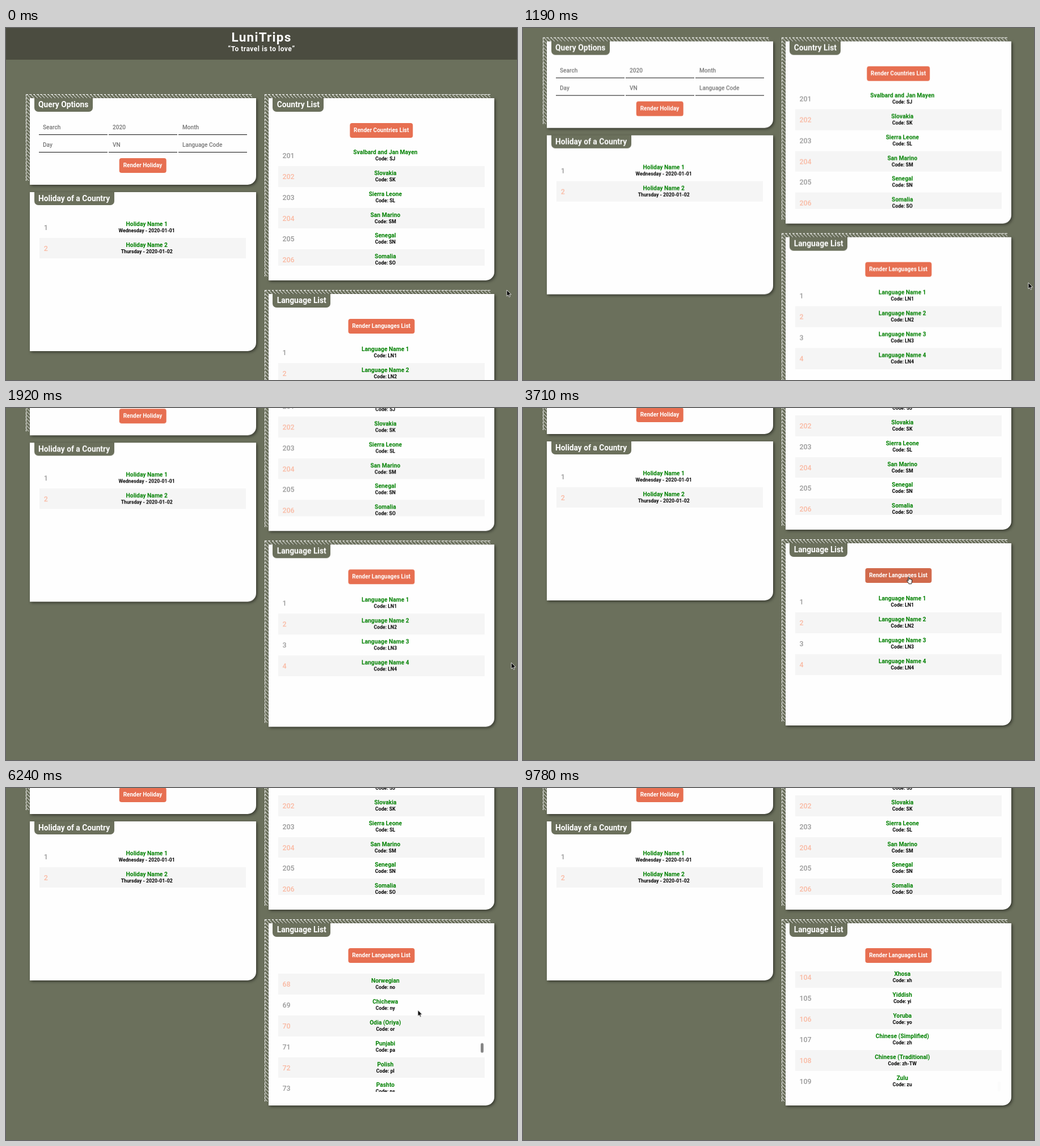
Recreate the animation shown at these times as an HTML page. Size 901 by 622 pixels, loop 9920 ms.

```html
<!DOCTYPE html>
<html lang="en">
<head>
<meta charset="utf-8">
<title>LuniTrips</title>
<style>
  html, body { margin: 0; width: 100%; height: 100%; overflow: hidden; background: #6b705c; }
  body { position: relative; font: 500 10.1px/12px Roboto, sans-serif; color: #000; }
  .page, .page div, .page span, svg { position: absolute; white-space: nowrap; }
  .page { left: 0; top: 0; width: 901px; height: 860px; }
  .top { left: 0; top: 0; width: 901px; height: 56px; background: #4b4c40; color: #fff; font-weight: 700; text-align: center; }
  .top span { left: 0; width: 100%; }
  .brand { top: 3px; font-size: 22.5px; line-height: 26px; letter-spacing: 1.25px; }
  .motto { top: 30px; font-size: 12px; line-height: 14px; letter-spacing: .5px; }

  .card { width: 398.5px; }
  .face { inset: 0; background: #fefefe; border-radius: 0 0 15px 0; box-shadow: 2px 2px 5px rgba(0, 0, 0, .5); }
  .hatch {
    inset: -7px 7px 7px -7px;
    background:
      repeating-linear-gradient(90deg, #fff 0 3.75px, transparent 3.75px 6.26px) 0 0 / 100% 1.25px no-repeat,
      repeating-linear-gradient(180deg, #fff 0 3.75px, transparent 3.75px 6.26px) 0 0 / 1.25px 100% no-repeat,
      repeating-linear-gradient(45deg, transparent 0 2.9px, #fff 3.65px, transparent 4.4px);
  }
  .tab { left: 7.5px; top: 0; height: 23.5px; padding: 0 7.5px; border-radius: 0 0 7px 7px; background: #6b705c; color: #fff; font: 700 13.77px/23px Roboto, sans-serif; }
  .btn { left: 199px; height: 26px; padding: 0 7px; border-radius: 4px; background: #e76f51; color: #fff; font-size: 10px; font-weight: 700; line-height: 26px; transform: translateX(-50%); }
  .field { width: 113.5px; height: 25px; padding-left: 7px; border-bottom: 1px solid #111; color: #757575; line-height: 25px; }

  .view { left: 17.4px; width: 363.5px; height: 213px; overflow: hidden; }
  .rows { left: 0; top: 0; width: 100%; }
  .row { left: 0; width: 100%; height: 36.85px; }
  .row.even { background: #f5f5f5; }
  .num { left: 7.3px; top: 11px; font-size: 12.5px; line-height: 15px; color: #999; }
  .even .num { color: #fab9a2; }
  .name, .note { left: 0; width: 377.6px; text-align: center; font-weight: 700; }
  .name { top: 7px; font-size: 10.3px; color: green; }
  .note { top: 18px; font-size: 8.7px; }
  .thumb { left: 357px; top: 2px; width: 5px; height: 17px; border-radius: 3px; background: #858585; }
  svg { left: 0; top: 0; overflow: visible; }
</style>
</head>
<body>
<div class="page" id="page">
  <div class="top">
    <span class="brand">LuniTrips</span>
    <span class="motto">“To travel is to love”</span>
  </div>

  <div class="card" style="left:42px;top:124px;height:153px">
    <div class="hatch"></div><div class="face"></div>
    <div class="tab">Query Options</div>
    <div id="fields"></div>
    <div class="btn" style="top:105.5px">Render Holiday</div>
  </div>

  <div class="card" style="left:42px;top:289.5px;height:281.5px">
    <div class="face"></div>
    <div class="tab">Holiday of a Country</div>
    <div class="view" style="top:44.3px"><div class="rows" id="holidays"></div></div>
  </div>

  <div class="card" style="left:462.7px;top:124px;height:322px">
    <div class="hatch"></div><div class="face"></div>
    <div class="tab">Country List</div>
    <div class="btn" style="top:44px">Render Countries List</div>
    <div class="view" style="top:83px"><div class="rows" id="countries"></div></div>
  </div>

  <div class="card" style="left:462.7px;top:470px;height:322px">
    <div class="hatch"></div><div class="face"></div>
    <div class="tab">Language List</div>
    <div class="btn" id="press" style="top:44px">Render Languages List</div>
    <div class="view" style="top:85.3px">
      <div class="rows" id="samples"></div>
      <div class="rows" id="languages"></div>
      <div class="thumb" id="thumb"></div>
    </div>
  </div>
</div>

<svg id="arrow" width="9" height="14"><path d="M0 0V10.8L2.5 8.6 4.1 12.3 5.9 11.5 4.3 7.9H7.7Z" stroke="#fff" stroke-width=".8"/></svg>
<svg id="hand" width="12" height="14"><path d="M3.2 7.6V1.5a.9.9 0 0 1 1.8 0v3.4l.2-.6a.8.8 0 0 1 1.6.3l.1.3a.8.8 0 0 1 1.5.2l.1.4a.7.7 0 0 1 1.4.2v2.4c0 2-.9 2.6-1 4.6H4.2C3.9 10.8 2 9.4 1 7.4.6 6.5 1.6 6 2.2 6.6z" fill="#fff" stroke="#000" stroke-width=".9"/></svg>

<script>
const LOOP = 9920, TICKS = 67, ROW = 36.85, END = 3804;
const $ = id => document.getElementById(id);

const LANGUAGES = `af Afrikaans,am Amharic,ar Arabic,az Azerbaijani,be Belarusian,bg Bulgarian,bn Bengali,bs Bosnian,ca Catalan,ceb Cebuano,
co Corsican,cs Czech,cy Welsh,da Danish,de German,el Greek,en English,eo Esperanto,es Spanish,et Estonian,
eu Basque,fa Persian,fi Finnish,fr French,fy Frisian,ga Irish,gd Scots Gaelic,gl Galician,gu Gujarati,ha Hausa,
haw Hawaiian,he Hebrew,hi Hindi,hmn Hmong,hr Croatian,ht Haitian Creole,hu Hungarian,hy Armenian,id Indonesian,ig Igbo,
is Icelandic,it Italian,ja Japanese,jv Javanese,ka Georgian,kk Kazakh,km Khmer,kn Kannada,ko Korean,ku Kurdish (Kurmanji),
ky Kyrgyz,la Latin,lb Luxembourgish,lo Lao,lt Lithuanian,lv Latvian,mg Malagasy,mi Maori,mk Macedonian,ml Malayalam,
mn Mongolian,mr Marathi,ms Malay,mt Maltese,my Myanmar (Burmese),ne Nepali,nl Dutch,no Norwegian,ny Chichewa,or Odia (Oriya),
pa Punjabi,pl Polish,ps Pashto,pt Portuguese,ro Romanian,ru Russian,rw Kinyarwanda,sd Sindhi,si Sinhala,sk Slovak,
sl Slovenian,sm Samoan,sn Shona,so Somali,sq Albanian,sr Serbian,st Sesotho,su Sundanese,sv Swedish,sw Swahili,
ta Tamil,te Telugu,tg Tajik,th Thai,tk Turkmen,tl Filipino,tr Turkish,tt Tatar,ug Uyghur,uk Ukrainian,
ur Urdu,uz Uzbek,vi Vietnamese,xh Xhosa,yi Yiddish,yo Yoruba,zh Chinese (Simplified),zh-TW Chinese (Traditional),zu Zulu`;

// "code name" entries to [name, note] pairs
const coded = text => text.split(',').map(entry => {
  const [, code, name] = entry.trim().match(/^(\S+) (.+)$/);
  return [name, 'Code: ' + code];
});

function fill(id, items, first = 1) {
  $(id).innerHTML = items.map(([name, note], i) => {
    const n = first + i;
    return `<div class="row${n % 2 ? '' : ' even'}" style="top:${i * ROW}px"><span class="num">${n}</span>` +
      `<span class="name">${name}</span><span class="note">${note}</span></div>`;
  }).join('');
}

fill('holidays', [['Holiday Name 1', 'Wednesday - 2020-01-01'], ['Holiday Name 2', 'Thursday - 2020-01-02']]);
fill('countries', coded('SJ Svalbard and Jan Mayen,SK Slovakia,SL Sierra Leone,SM San Marino,SN Senegal,SO Somalia'), 201);
fill('samples', coded([1, 2, 3, 4].map(n => `LN${n} Language Name ${n}`).join()));
fill('languages', coded(LANGUAGES));

$('fields').innerHTML = ['Search', '2020', 'Month', 'Day', 'VN', 'Language Code'].map((label, i) =>
  `<div class="field" style="left:${16 + i % 3 * 123}px;top:${i < 3 ? 39 : 70}px">${label}</div>`).join('');

// Motion is a function of the tick (about 148 ms), held until the next one
const sheet = document.head.appendChild(document.createElement('style'));
function track(id, css) {
  let frames = '';
  for (let k = 0; k < TICKS; k++) {
    const t = Math.floor(k * LOOP / TICKS / 10) * 10;
    frames += `${t / LOOP * 100}%{${css(k)}}`;
  }
  sheet.textContent += `@keyframes ${id}{${frames}100%{${css(TICKS - 1)}}}`;
  $(id).style.animation = `${id} ${LOOP}ms step-end infinite`;
}

const clamp = x => Math.min(1, Math.max(0, x));
const span = (k, from, to) => clamp((k - from) / (to - from));
const within = (k, from, to) => k >= from && k < to ? 1 : 0;
const move = (x, y) => `transform:translate(${x}px,${y}px);`;
const fade = a => `opacity:${a};`;

// Straight glide from start through [from tick, to tick, x, y] moves
const glide = (k, start, moves) => moves.reduce(([x, y], [from, to, nx, ny]) => {
  const p = span(k, from, to);
  return [x + (nx - x) * p, y + (ny - y) * p];
}, start);

const pageY = k => 216 * span(k, 3, 11) ** 1.63 + 12.7 * span(k, 12, 13) + 2.3 * span(k, 13, 14);

function listY(k) {
  const p = span(k, 36, 46);
  return END * p * p * (3 - 2 * p) - 70 * Math.sin(Math.PI * span(k, 53, 58));
}

const arrowAt = k => glide(k, [883, 463], [
  [0, 2, 890, 461], [3, 5, 891, 450], [16, 21, 688, 300], [30, 31, 725, 292], [31, 33, 768, 281],
  [35, 36, 732.5, 378], [36, 46, 722, 402], [49, 50, 718, 406.5], [50, 52, 711, 409.5], [60, 62, 846, 600]]);
const handAt = k => glide(k, [688, 297], [[24, 25, 676, 298]]);

track('page', k => move(0, -pageY(k)));
track('press', k => `background:${within(k, 25, 27) ? '#d16a4c' : '#e76f51'};`);
track('samples', k => fade(within(k, 0, 27)));
track('languages', k => fade(within(k, 31, TICKS)) + move(0, -listY(k)));
track('thumb', k => fade(within(k, 37, TICKS) * (1 - .97 * span(k, 64, 66))) + move(0, listY(k) / END * 192.5));
track('arrow', k => fade(within(k, 0, 21) + within(k, 31, 63)) + move(...arrowAt(k)));
track('hand', k => fade(within(k, 21, 31)) + move(...handAt(k)));
</script>
</body>
</html>
```
